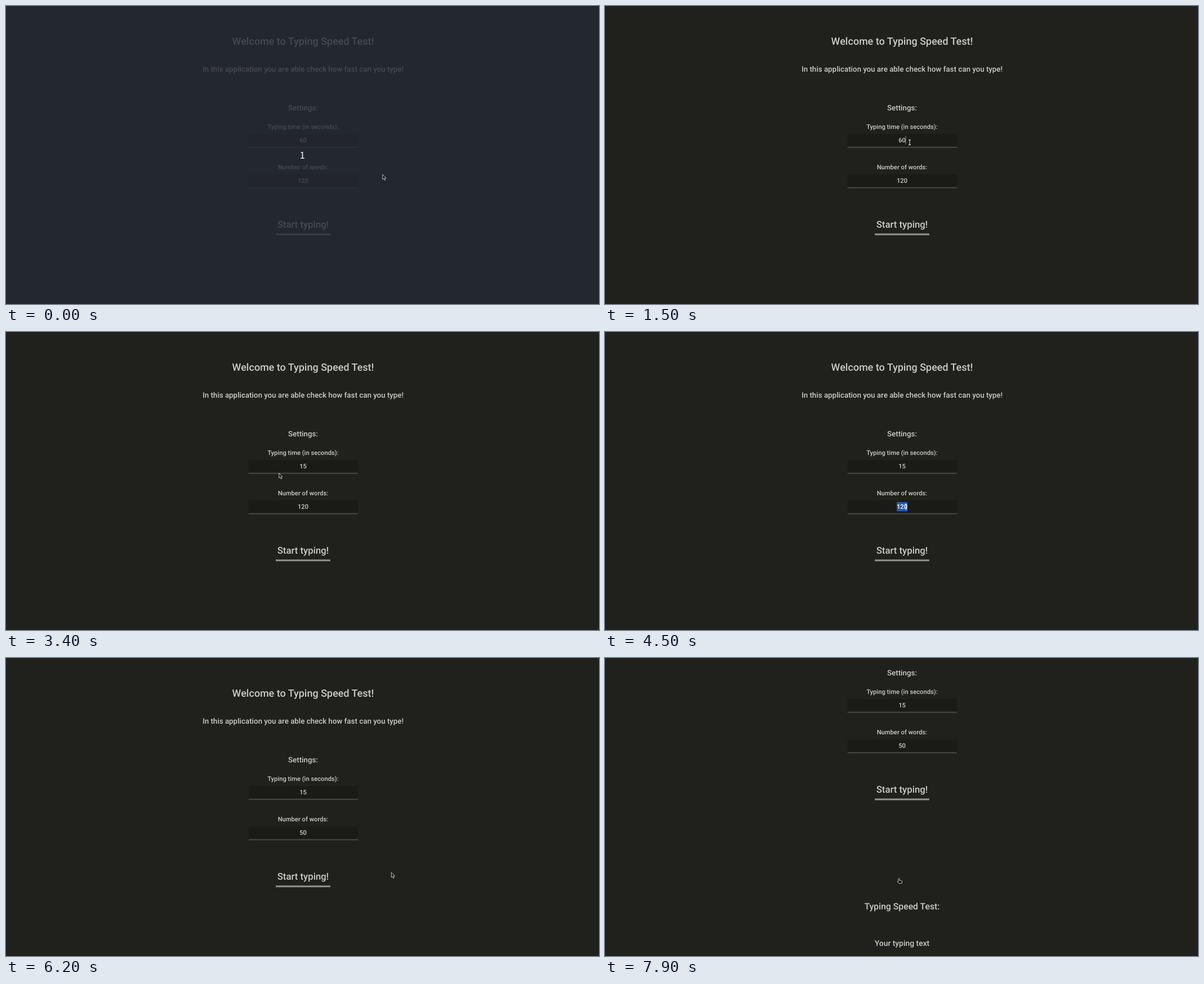
An HTML page for the animation above (8 s loop, 1055 by 531 pixels).

```html
<!DOCTYPE html>
<html lang="en">
<head>
<meta charset="utf-8">
<title>Typing Speed Test</title>
<style>
html, body { margin: 0; width: 100%; height: 100%; overflow: hidden; background: #20211c; }
svg { display: block; }
text { font: 500 11.2px Roboto, sans-serif; fill: #cbcbc6; text-anchor: middle; text-rendering: geometricPrecision; }
#veil text { font: 400 17px 'Noto Sans CJK JP', 'Noto Sans CJK SC', sans-serif; fill: #fff; }
#cursor path { fill: #151612; stroke: #d0d0cc; stroke-width: .9; stroke-linejoin: round; }
</style>
</head>
<body>
<svg width="1055" height="531" viewBox="0 0 1055 531">
  <rect width="1055" height="531" fill="#20211c"/>
  <g id="page"></g>
  <g id="veil">
    <rect width="1055" height="531" fill="#252932" opacity=".8"/>
    <text x="527.3" y="272">1</text>
  </g>
  <g id="cursor">
    <path id="arrow" d="M0 0V8.8L2 7.2L3.5 10.5L5 9.8L3.6 6.6H6.2Z"/>
    <path id="beam" d="M-2-4.3H2M-2 4.3H2M0-4.3V4.3" style="stroke-width:1.2"/>
    <path id="hand" d="M-1 .8Q0-.6 1 .8V3.8L4.6 4.4Q5.8 4.7 5.6 6L5 9H-.2L-2.6 6.2Q-2.8 4.8-1 5.6Z"/>
  </g>
</svg>
<script>
const $ = id => document.getElementById(id);
const MID = 528.5, DIGIT = 6.36, STEP = 100, LOOP = 8000;

// Each field is selected by a drag (press to release), retyped key by key, then left (blur)
const fields = [
  { id: 'time', y: 228, before: '60', after: '15', press: 1400, release: 1700,
    hide: 1900, keys: [2600, 3000], blur: 3200 },
  { id: 'words', y: 300, before: '120', after: '50', press: 4000, release: 4200,
    hide: 5000, keys: [5000, 5200], blur: 5800 }
];

// Pointer moves: start time, end time, x and y to reach, height of the arc
const moves = [
  [100, 300, 658, 294], [400, 1300, 548, 243.5],
  [1300, 1500, 542, 243], [1500, 1700, 523, 244],
  [3100, 3400, 485.7, 251.3], [3400, 3700, 559, 314],
  [3800, 4200, 519, 311], [4300, 4500, 535.5, 311],
  [5700, 6200, 685.5, 382], [6300, 7100, 517, 403, 43],
  [7200, 7600, 523, 392.5]
];

const label = (text, y, size) =>
  `<text x="${MID}" y="${y}" style="font-size:${size}px">${text}</text>`;
const field = ({ id, y }) => `
  <rect x="431.5" y="${y}" width="194.5" height="23" fill="#1a1b17"/>
  <rect x="431.5" y="${y + 22.7}" width="194.5" height="2.1" fill="#474843"/>
  <rect id="${id}Sel" y="${y + 3}" height="16.5" fill="#2259b8"/>
  <text id="${id}" x="${MID}" y="${y + 15}"></text>
  <rect id="${id}Caret" y="${y + 3.5}" width=".7" height="15" fill="#cbcbc6"/>`;

$('page').innerHTML =
  label('Welcome to Typing Speed Test!', 69.2, 18.02) +
  label('In this application you are able check how fast can you type!', 116.7, 13.35) +
  label('Settings:', 185.7, 13.35) +
  label('Typing time (in seconds):', 219, 11.2) + field(fields[0]) +
  label('Number of words:', 291, 11.2) + field(fields[1]) +
  label('Start typing!', 395.2, 16.75) +
  `<rect x="480" y="405.4" width="97" height="3" fill="#93948f"/>` +
  label('Typing Speed Test:', 602.8, 15.8) +
  label('Your typing text', 667.7, 13.9);

const show = (id, on) => $(id).setAttribute('display', on ? 'inline' : 'none');
const clamp = (v, lo, hi) => Math.min(hi, Math.max(lo, v));

function pointerAt(t) {
  let x = 670, y = 300;
  for (const [from, to, toX, toY, lift = 0] of moves) {
    const k = clamp((t - from) / (to - from), 0, 1);
    const ease = k * k * (3 - 2 * k);
    x += (toX - x) * ease;
    y += (toY - y) * ease - lift * Math.sin(Math.PI * k);
  }
  return [x, y];
}

function drawField({ id, before, after, press, release, keys, blur }, t) {
  const typed = keys.filter(k => k <= t).length;
  const text = typed ? after.slice(0, typed) : before;
  const right = MID + text.length * DIGIT / 2;
  const dragX = pointerAt(Math.min(t, release))[0];
  const selected = t < press || typed ? 0
    : clamp(Math.ceil((right - dragX) / DIGIT), 0, text.length);
  $(id).textContent = text;
  $(id).style.fill = selected === text.length ? '#fff' : '';
  $(id + 'Sel').setAttribute('x', right - selected * DIGIT);
  $(id + 'Sel').setAttribute('width', selected * DIGIT);
  $(id + 'Caret').setAttribute('x', right - .2);
  show(id + 'Caret', t >= press && t < blur && !selected);
}

function drawCursor(t) {
  const [x, y] = pointerAt(t);
  const inField = Math.abs(x - MID) < 97 && fields.some(f => y > f.y && y < f.y + 22);
  const onButton = Math.abs(x - MID) < 48 && y > 374 && y < 410;
  $('cursor').setAttribute('transform', `translate(${x} ${y})`);
  show('cursor', !fields.some(f => t >= f.hide && t < f.blur));
  show('beam', inField);
  show('hand', onButton);
  show('arrow', !inField && !onButton);
}

function draw() {
  const t = Math.floor(performance.now() % LOOP / STEP) * STEP;
  show('veil', t < 100);
  $('page').setAttribute('transform', `translate(0 ${t < 7900 ? 0 : -155})`);
  fields.forEach(f => drawField(f, t));
  drawCursor(t);
  requestAnimationFrame(draw);
}
draw();
</script>
</body>
</html>
```
